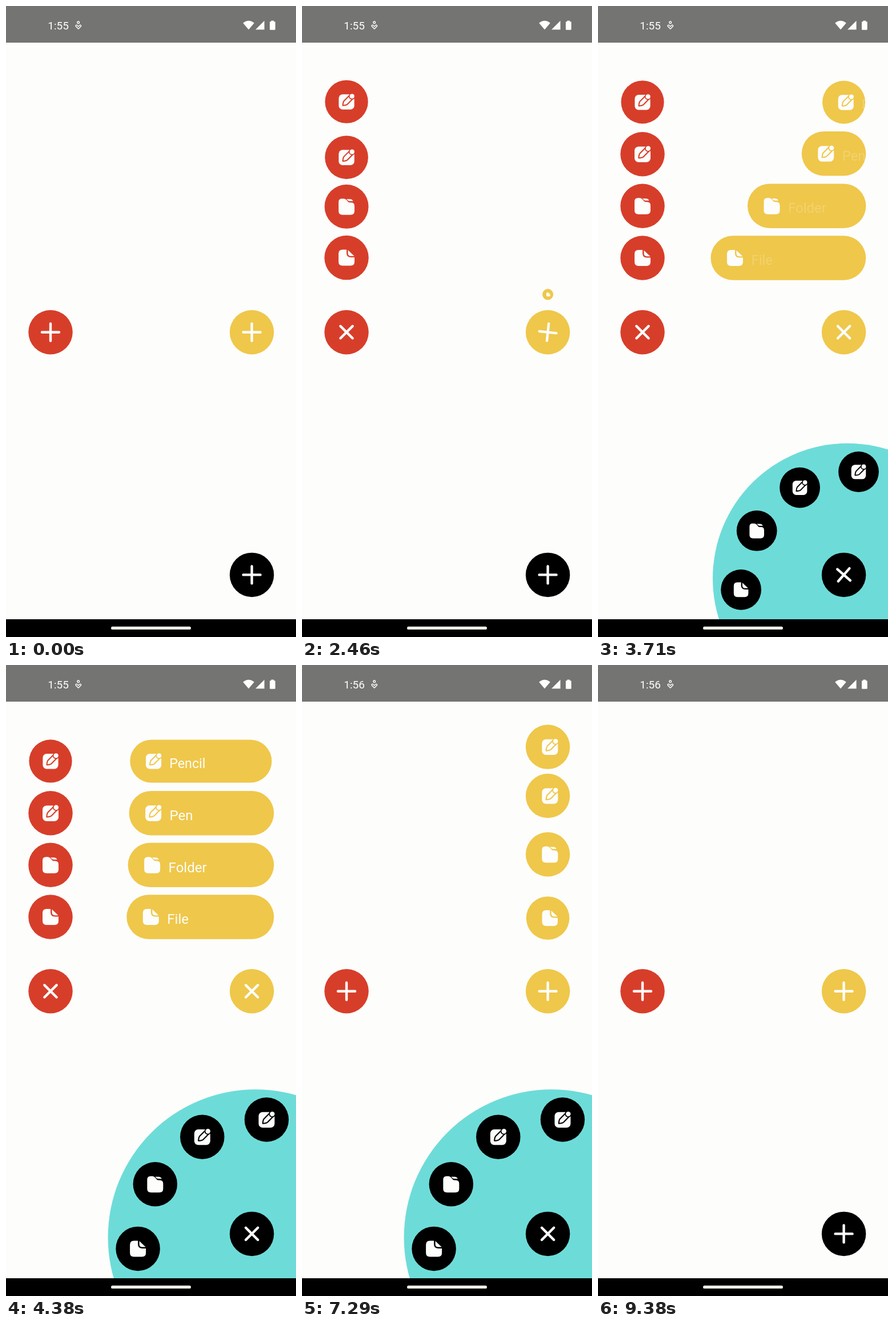
Animation, 508 px wide and 1102 px high, one loop 9500 ms. Source, as an HTML page with a canvas:

```html
<!DOCTYPE html>
<html lang="en">
<head>
<meta charset="utf-8">
<title>Floating action buttons</title>
<style>
html, body { margin: 0; width: 100%; height: 100%; overflow: hidden; background: #fdfdfc; }
canvas { display: block; width: 508px; height: 1102px; }
</style>
</head>
<body>
<canvas id="stage" width="508" height="1102"></canvas>
<script>
const LOOP = 9500, R = 38.75;
const RED = '#d73e2a', YELLOW = '#efc74a', BLACK = '#000', TEAL = '#6ddcd8', WHITE = '#fdfdfc';
const c = document.getElementById('stage').getContext('2d');

const filePath = new Path2D('M0-14H-7Q-14-14-14-7V7Q-14 14-7 14H7Q14 14 14 7V-.5H8Q0-.5 0-8Z M2.5-13.3L13.5-2.8H8Q2.5-2.8 2.5-8Z');
const folderPath = new Path2D('M-8-14H-5Q-2.5-14-.5-12L3-8Q4-7 6-7H8Q14-7 14-1V8Q14 14.5 7 14.5H-7Q-14 14.5-14 8V-8Q-14-14-8-14Z M0-13H6Q10-13 11.5-9.5H5Q3-9.5 0-13Z');
const penPath = new Path2D('M5.5-11.5L-4.5-1.5Q-6.3.5-6.7 6.7Q-.5 6.5 1.7 4.5L12-6');

// One entry per menu row, nearest to the button first
const items = [
  { label: 'File', dist: 129.7, full: 129.7, delay: 0, icon: filePath },
  { label: 'Folder', dist: 220.4, full: 220.4, delay: 100, icon: folderPath },
  { label: 'Pen', dist: 311, full: 311, delay: 200 },
  { label: 'Pencil', dist: 401.8, full: 412, delay: 420 }
];

const clamp = x => Math.min(1, Math.max(0, x));
const ease = x => (x = clamp(x), x < .5 ? 2 * x * x : 1 - 2 * (1 - x) ** 2);
const backIn = x => (x = clamp(x), x * x * (2.7 * x - 1.7));

// Underdamped spring from 0 to 1: stiffness 100, damping 10, mass 1
function spring(ms) {
  if (ms <= 0) return 0;
  const s = ms / 1000, w = 8.66 * s;
  return 1 - Math.exp(-5 * s) * (Math.cos(w) + .577 * Math.sin(w));
}

// Eased 0 -> 1 -> 0
const toggle = (t, open, close, up, down) =>
  ease((t - open) / up) - ease((t - close) / down);

function disc(x, y, r, color) {
  c.fillStyle = color;
  c.beginPath();
  c.arc(x, y, r, 0, 7);
  c.fill();
}

function pill(x, y, w, h, r, color) {
  c.fillStyle = color;
  c.beginPath();
  c.roundRect(x, y, w, h, r);
  c.fill();
}

function at(x, y, scale, draw) {
  c.save();
  c.translate(x, y);
  c.scale(scale, scale);
  draw();
  c.restore();
}

function drawIcon(icon, back) {
  if (icon) {
    c.fillStyle = WHITE;
    c.fill(icon);
    return;
  }
  pill(-14, -13.3, 28, 27.3, 7, WHITE);
  c.strokeStyle = back;
  c.lineWidth = 2.1;
  c.lineJoin = 'round';
  c.stroke(penPath);
  disc(9.9, -9.9, 6, back);
  disc(9.9, -9.9, 4.2, WHITE);
}

function button(x, y, color, turn) {
  disc(x, y, R, color);
  c.save();
  c.translate(x, y);
  c.rotate(turn * Math.PI / 4);
  c.strokeStyle = WHITE;
  c.lineWidth = 4.4;
  c.lineCap = 'round';
  c.beginPath();
  c.moveTo(-15, 0); c.lineTo(15, 0);
  c.moveTo(0, -15); c.lineTo(0, 15);
  c.stroke();
  c.restore();
}

// Calls draw(item, index) at each row's moving, scaled centre
function column(t, x, open, close, draw) {
  items.forEach((item, i) => {
    const p = spring(t - open - item.delay) - backIn((t - close - i * 40) / 300);
    const d = t > close + i * 40 + 300 ? 0 : p * item.dist;
    const low = 34 + item.dist * .085;
    const scale = clamp((d - low) / (item.full - low));
    if (scale > 0) at(x, 569.7 - d, scale, () => draw(item, i));
  });
}

function redMenu(t) {
  column(t, 78, 1440, 5774, item => {
    disc(0, 0, R, RED);
    drawIcon(item.icon, RED);
  });
  button(78, 569.7, RED, toggle(t, 1440, 5774, 500, 360));
}

function yellowMenu(t) {
  const shrink = 1 - ease((t - 6920) / 180);
  const alpha = ease((t - 3550) / 500) * shrink;
  column(t, 430.6, 2330, 7098, (item, i) => {
    const grow = spring(t - 3440 - i * 100) * shrink;
    const w = 2 * R + 181 * grow, left = R - w;
    // Scaling is about the pill's own centre
    const s = c.getTransform().a, mid = R - w / 2;
    c.translate(mid / s - mid, 0);
    pill(left, -R, w, 2 * R, R, YELLOW);
    c.clip();
    c.save();
    c.translate(left + 42.5, 0);
    drawIcon(item.icon, YELLOW);
    c.restore();
    c.globalAlpha = alpha;
    c.fillStyle = WHITE;
    c.font = '24px Roboto, sans-serif';
    c.fillText(item.label, left + 71, 12.3);
  });
  button(430.6, 569.7, YELLOW, toggle(t, 2330, 6920, 500, 360));
}

function blackMenu(t) {
  const p = toggle(t, 3315, 7960, 500, 500);
  if (p > 0) {
    disc(437, 999.7, 258.4 * p, TEAL);
    items.forEach((item, i) => {
      const a = Math.PI * (1 + i / 6), r = 225.4 * p;
      at(456.5 + r * Math.cos(a), 1019.4 + r * Math.sin(a), p, () => {
        disc(0, 0, R, BLACK);
        drawIcon(item.icon, BLACK);
      });
    });
  }
  button(430.6, 993.4, BLACK, p);
}

function systemBars(t) {
  c.fillStyle = '#747472';
  c.fillRect(0, 0, 508, 64);
  c.fillStyle = c.strokeStyle = '#fff';
  c.font = '19px Roboto, sans-serif';
  c.fillText(t < 6600 ? '1:55' : '1:56', 73.2, 40.8);
  c.lineWidth = 1.5;
  c.lineJoin = 'round';
  c.stroke(new Path2D('M128.6 28.8A1.9 1.9 0 1 1 128.6 28.7Z M126.8 40L122.3 35.5Q121.6 33 124 33.2L126.8 35.8L129.6 33.2Q132 33 131.3 35.5Z'));
  c.fill(new Path2D('M415.2 29.7Q425 22 434.8 29.7L425 41.3Z M452.6 25.8V41.3H437Z'));
  pill(462, 27.3, 9.7, 14.5, 1.2, '#fff');
  c.fillRect(464.4, 25.6, 4.8, 3);
  c.fillStyle = '#000';
  c.fillRect(0, 1071, 508, 31);
  pill(184, 1083.8, 140, 5.2, 2.6, '#eeeee8');
}

function frame(now) {
  const t = now % LOOP;
  c.fillStyle = WHITE;
  c.fillRect(0, 0, 508, 1102);
  redMenu(t);
  yellowMenu(t);
  blackMenu(t);
  systemBars(t);
  requestAnimationFrame(frame);
}
requestAnimationFrame(frame);
</script>
</body>
</html>
```
